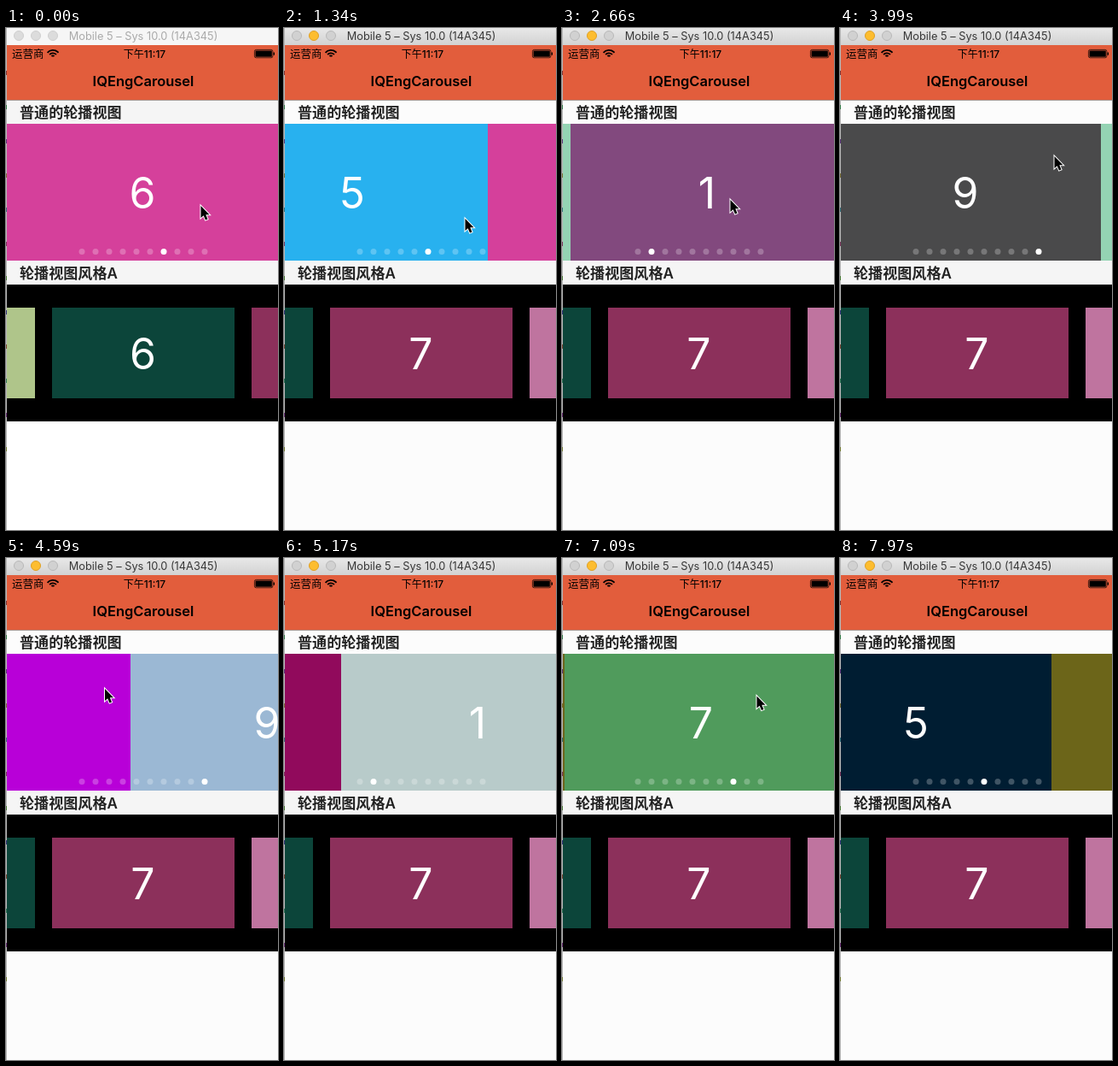
An HTML page with a canvas that plays this animation: 319 by 587 pixels, repeating every 8 s.

```html
<!DOCTYPE html>
<html lang="zh-CN">
<head>
<meta charset="utf-8">
<style>
  html, body { margin: 0; width: 100%; height: 100%; overflow: hidden; background: #fff; }
  canvas { display: block; }
</style>
</head>
<body>
<canvas width="319" height="587"></canvas>
<script>
const ctx = document.querySelector('canvas').getContext('2d');
const LOOP = 8000, STEP = 147.5;
const ACTIVATE = 5, RECOLOR = 30;          // step numbers
const SWIPE_STEPS = 3.42, PAGES = 10, WIDTH = 319;
const LATIN = 'Inter, Roboto, sans-serif';
const HAN = 'Inter, "Noto Sans CJK SC", "Noto Sans CJK", sans-serif';

// Colours by page number; recycled pages get new ones.
const EARLY = { 0: '#94d3b3', 1: '#82497e', 5: '#28b1ef', 6: '#d5409b', 8: '#b800d8', 9: '#4a4a4b' };
const LATE = { 0: '#910a5c', 1: '#b8cbca', 5: '#001d32', 6: '#6c6519', 8: '#b800d8', 9: '#9bb8d4' };
const CARDS = { 5: '#afc58a', 6: '#0c453a', 7: '#8c305b', 8: '#bf749f' };

// Runs of evenly spaced swipes.
const RUNS = [
  { start: 6.75, count: 5, gap: 1.95, dir: -1 },
  { start: 17.64, count: 2, gap: 6.36, dir: -1 },
  { start: 27.1, count: 1, gap: 0, dir: -1 },
  { start: 29.2, count: 3, gap: 1.695, dir: 1 },
  { start: 36.2, count: 3, gap: 1.885, dir: -1 },
  { start: 44, count: 3, gap: 3.81, dir: -1 },
];

// Pointer key points: step, x, y
const POINTER = [[0, 228, 207], [3, 104, 236], [9, 212, 222], [18, 197, 200],
  [27, 251, 149], [35, -20, 155], [42, 121, 161], [54, 335, 160]];

const mod = (a, n) => ((a % n) + n) % n;
const lerp = (a, b, u) => a + (b - a) * u;
const swipe = (step, start) => {
  const u = Math.min(1, Math.max(0, (step - start) / SWIPE_STEPS));
  return u * u * (3 - 2 * u);
};

function pagePosition(step) {
  let position = 6;
  for (const { start, count, gap, dir } of RUNS)
    for (let i = 0; i < count; i++) position += dir * swipe(step, start + i * gap);
  return position;
}

function rect(x, y, w, h, color) {
  ctx.fillStyle = color;
  ctx.fillRect(x, y, w, h);
}

function disc(x, y, r, fill, stroke) {
  ctx.beginPath();
  ctx.arc(x, y, r, 0, 7);
  ctx.fillStyle = fill;
  ctx.fill();
  if (stroke) {
    ctx.strokeStyle = stroke;
    ctx.lineWidth = 1;
    ctx.stroke();
  }
}

function text(str, x, y, font, color = '#000', align = 'center') {
  ctx.font = font;
  ctx.fillStyle = color;
  ctx.textAlign = align;
  ctx.fillText(str, x, y);
}

const digit = (n, x, y) => text(n, x, y, `400 50px ${LATIN}`, '#fff');

function drawTitleBar(active) {
  const shade = ctx.createLinearGradient(0, 0, 0, 20);
  shade.addColorStop(0, active ? '#e8e8e8' : '#f6f6f6');
  shade.addColorStop(1, active ? '#d2d2d2' : '#f6f6f6');
  rect(1, 0, 318, 20, shade);
  for (let i = 0; i < 3; i++) {
    const lit = active && i === 1;
    disc(15 + 20 * i, 9, 5.5, lit ? '#fdbd2f' : active ? '#d1d1d1' : '#dcdcdc',
      lit ? '#dfa023' : active ? '#b9b9b9' : '#cfcfcf');
  }
  text('Mobile 5 – Sys 10.0 (14A345)', 161, 14, `400 12.8px ${LATIN}`, active ? '#383838' : '#aaa');
}

function drawWifi() {
  ctx.strokeStyle = ctx.fillStyle = '#000';
  ctx.lineWidth = 1.8;
  for (const r of [2, 5.2, 8.6]) {
    ctx.beginPath();
    ctx.arc(55, 34.5, r, -Math.PI * 0.77, -Math.PI * 0.23);
    ctx.stroke();
  }
}

function drawBattery() {
  ctx.lineWidth = 0.7;
  ctx.beginPath();
  ctx.roundRect(291.4, 25.4, 21.5, 9.4, 2);
  ctx.stroke();
  rect(292.5, 26.5, 19.3, 7.2, '#000');
  rect(313.6, 28.5, 1.4, 3.2, '#000');
}

function drawHeader() {
  rect(1, 20, 318, 64, '#e25d3c');
  rect(1, 84, 318, 1, '#a99a95');
  text('运营商', 7, 35, `400 12.5px ${HAN}`, '#000', 'left');
  text('下午11:17', 162.5, 35, `500 12px ${HAN}`);
  text('IQEngCarousel', 161, 68, `600 16.5px ${LATIN}`);
  drawWifi();
  drawBattery();
}

function drawHeading(label, y, bg, h) {
  rect(1, y, 318, h, bg);
  text(label, 16, y + h - 7, `600 17.1px ${HAN}`, '#222', 'left');
}

function drawPages(position, colors) {
  ctx.save();
  ctx.beginPath();
  ctx.rect(1, 112, 318, 160);
  ctx.clip();
  const first = Math.floor(position);
  for (let i = first; i <= first + 1; i++) {
    const x = Math.round((i - position) * WIDTH), page = mod(i, PAGES);
    rect(x, 112, WIDTH, 160, colors[page] || `hsl(${page * 70} 32% 46%)`);
    digit(page, x + 160, 211);
  }
  ctx.restore();
  const current = mod(Math.round(position), PAGES);
  for (let i = 0; i < PAGES; i++)
    disc(89 + 16 * i, 261.5, 3.5, i === current ? '#fff' : 'rgba(255,255,255,.25)');
}

function drawCards(position) {
  rect(1, 300, 318, 160, '#000');
  for (const n in CARDS) {
    const x = Math.round(54 + (n - position) * 234);
    rect(x, 327, 214, 106, CARDS[n]);
    digit(n, x + 106.5, 399);
  }
}

// A sliver of the window behind.
function drawLeftEdge() {
  rect(0, 0, 1, 587, '#b8b8b8');
  for (let i = 0; i < 12; i++)
    rect(0, 50 + 40 * i, 1, 5, `hsl(${i * 137} 40% 35%)`);
}

function drawPointer(step) {
  const i = Math.max(1, POINTER.findIndex(key => key[0] >= step));
  const [s0, x0, y0] = POINTER[i - 1], [s1, x1, y1] = POINTER[i];
  const u = (step - s0) / (s1 - s0);
  ctx.save();
  ctx.translate(lerp(x0, x1, u) + 0.5, lerp(y0, y1, u) + 1);
  const arrow = new Path2D('M0 0V14L3.2 11.2 5.5 16.5 8 15.4 5.8 10.2H10Z');
  ctx.lineWidth = 2;
  ctx.strokeStyle = '#fff';
  ctx.stroke(arrow);
  ctx.fillStyle = '#000';
  ctx.fill(arrow);
  ctx.restore();
}

function draw(step) {
  const active = step >= ACTIVATE;
  rect(0, 0, WIDTH, 587, active ? '#fcfcfc' : '#fff');
  drawTitleBar(active);
  drawHeader();
  drawHeading('普通的轮播视图', 85, active ? '#fcfcfc' : '#f5f5f5', 27);
  drawPages(pagePosition(step), step < RECOLOR ? EARLY : LATE);
  drawHeading('轮播视图风格A', 272, '#f5f5f5', 28);
  drawCards(6 + swipe(step, 5.5));
  drawLeftEdge();
  drawPointer(step);
}

const begin = performance.now();
function tick() {
  draw(Math.floor((performance.now() - begin) % LOOP / STEP));
  requestAnimationFrame(tick);
}
tick();
</script>
</body>
</html>
```
